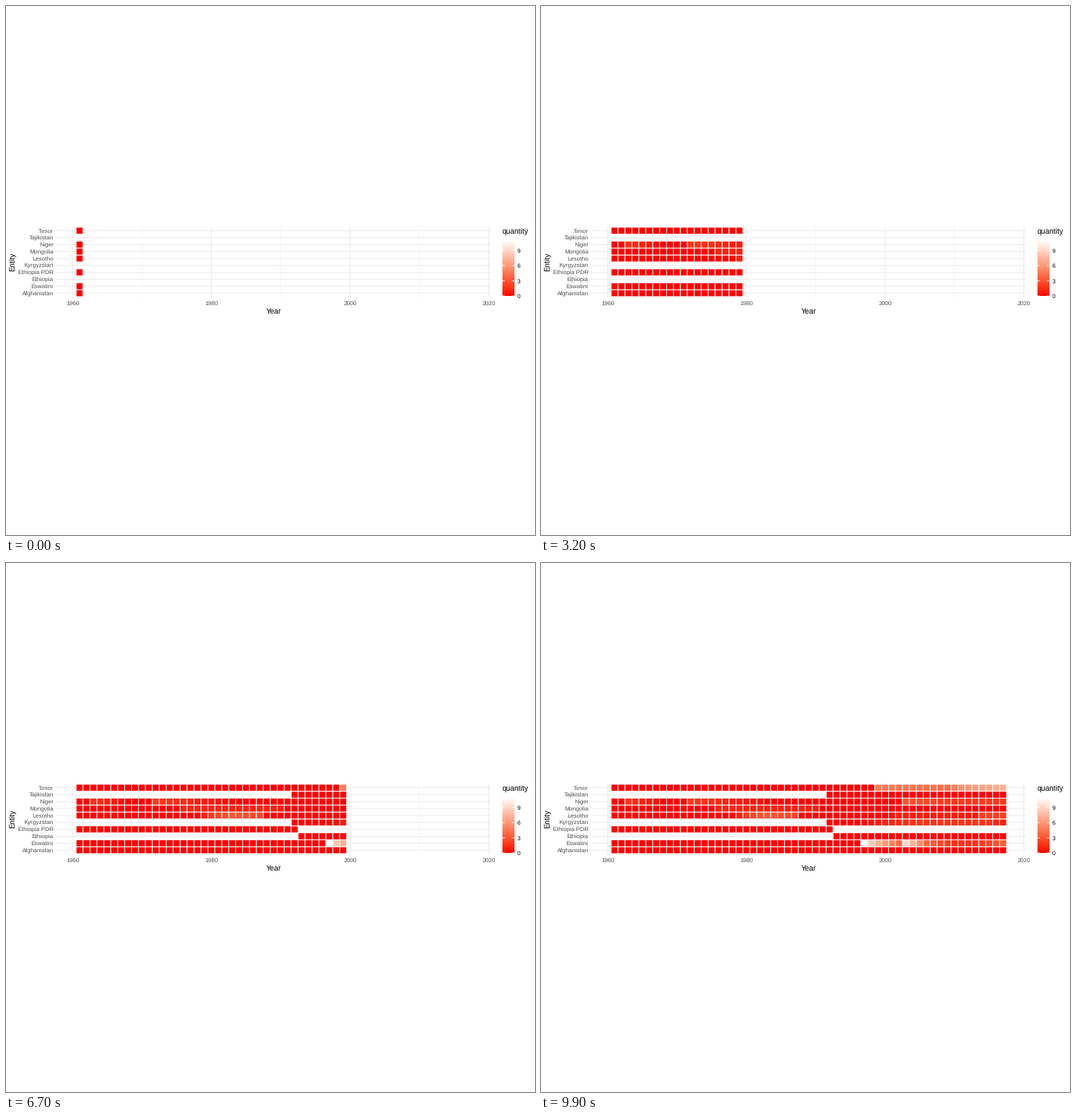
A matplotlib script that plays this animation: 748x748 px, repeating every 10 s.

```python
import numpy as np
import matplotlib.pyplot as plt
from matplotlib.animation import FuncAnimation
from matplotlib.collections import PolyCollection

plt.rcParams["font.family"] = "Liberation Sans"
plt.rcParams["text.hinting"] = "none"

SIZE, DPI = 748, 100
FRAMES, INTERVAL = 100, 100
FIRST, LAST = 1961, 2017
CELL = 9.81
LEFT, RIGHT, TOP, BOTTOM = 71.2, 686.1, 311.8, 412.0
PEAK = 11
SMALL, LARGE = 8.4, 10.6
LINE = 1.07

ENTITIES = ["Afghanistan", "Eswatini", "Ethiopia", "Ethiopia PDR", "Kyrgyzstan",
            "Lesotho", "Mongolia", "Niger", "Tajikistan", "Timor"]
SPANS = {"Ethiopia": (1993, LAST), "Ethiopia PDR": (FIRST, 1992),
         "Kyrgyzstan": (1992, LAST), "Tajikistan": (1992, LAST)}
# Turning points (year, quantity), joined by straight lines; the rest stay at 0
TRENDS = {
    "Timor": [(1998, 0), (1999, 4.6), (2009, 4), (2011, 5.8), (2017, 7.2)],
    "Niger": [(1962, 0), (1963, 1.6), (1968, 0), (1971, 0), (1972, 1.8),
              (1984, 0), (2002, 0), (2003, 2.8), (2010, 1.7)],
    "Mongolia": [(1975, 0), (1976, 1), (1990, 0.8), (1991, 0)],
    "Lesotho": [(1978, 0), (1980, 1.9), (1983, 3), (1987, 2.2), (1988, 0),
                (2000, 0), (2002, 0.8), (2013, 0.6), (2014, 2)],
    "Kyrgyzstan": [(1996, 0), (2000, 1), (2005, 1.6), (2015, 1.5), (2017, 0.8)],
    "Eswatini": [(1996, 0), (1997, PEAK), (1998, 8.2), (2002, 3.8), (2003, 9),
                 (2006, 3.6), (2010, 1.6), (2013, 1.5), (2017, 3.3)],
}


def series(name):
    """Yearly values of one entity, NaN outside its span."""
    start, end = SPANS.get(name, (FIRST, LAST))
    points = TRENDS.get(name, [(FIRST, 0)])
    inside = (years >= start) & (years <= end)
    return np.where(inside, np.interp(years, *zip(*points)), np.nan)


def shade(value):
    """Red to white, passing through orange."""
    t = np.asarray(value, float) / PEAK
    return np.stack([np.ones_like(t), t ** 0.85, t ** 1.25], -1)


def x_of(year):
    return 94.2 + (year - 1960) * CELL


def y_of(row):
    return 406.05 - row * CELL


def pt(px):
    return px * 72 / DPI


def label(x, y, text, size, color="black", ha="left", rotation=0):
    ax.text(x, y, text, fontsize=pt(size), color=color, ha=ha, va="baseline",
            rotation=rotation, rotation_mode="anchor")


def rule(xs, ys, width=LINE, color="#EBEBEB", z=1):
    ax.plot(xs, ys, color=color, lw=pt(width), zorder=z,
            solid_capstyle="butt", snap=False)


def draw_axes():
    for year in range(1960, 2021, 10):
        major = year % 20 == 0
        rule([x_of(year)] * 2, [TOP, BOTTOM], LINE if major else LINE / 2)
        if major:
            label(x_of(year), 422.8, str(year), SMALL, "#4D4D4D", "center")
    for row, name in enumerate(ENTITIES):
        y = y_of(row)
        rule([LEFT, RIGHT], [y, y])
        label(67, y + 3, name, SMALL, "#4D4D4D", "right")
    label(378.7, 435, "Year", LARGE, ha="center")
    label(13, 361.9, "Entity", LARGE, ha="center", rotation=90)


def draw_legend():
    x0, x1, top, base = 702, 718.4, 331, 410
    label(701.3, 322.8, "quantity", LARGE)
    ramp = shade(np.linspace(PEAK, 0, 240))[:, None, :]
    ax.imshow(ramp, extent=(x0, x1, base, top), aspect="auto", zorder=2)
    for v in range(0, 10, 3):
        y = base - v * 7.15
        for a, b in ((x0, x0 + 3.2), (x1 - 3.2, x1)):
            rule([a, b], [y, y], color="white", z=3)
        label(722.8, y + 3, str(v), SMALL)


def tiles(year, column):
    """Square outlines and colours for one year's column."""
    h = CELL / 2
    x = x_of(year)
    rows = np.flatnonzero(~np.isnan(column))
    verts = [[(x - h, y - h), (x + h, y - h), (x + h, y + h), (x - h, y + h)]
             for y in map(y_of, rows)]
    return verts, list(shade(column[rows]))


years = np.arange(FIRST, LAST + 1)
values = np.array([series(name) for name in ENTITIES])
# Each year lands on a whole frame, motion is linear in between
keys = np.round((years - FIRST) / (LAST - FIRST) * (FRAMES - 1)).astype(int)

fig = plt.figure(figsize=(SIZE / DPI, SIZE / DPI), dpi=DPI, facecolor="white")
ax = fig.add_axes([0, 0, 1, 1])
draw_axes()
draw_legend()
ax.set_xlim(0, SIZE)
ax.set_ylim(SIZE, 0)
ax.axis("off")

heat = PolyCollection([], edgecolors="white", linewidths=pt(LINE), zorder=4)
heat.set_joinstyle("miter")
heat.set_snap(False)
ax.add_collection(heat, autolim=False)


def update(frame):
    last = int(np.searchsorted(keys, frame, side="right")) - 1
    columns = [(years[i], values[:, i]) for i in range(last + 1)]
    if frame > keys[last]:
        t = (frame - keys[last]) / (keys[last + 1] - keys[last])
        mix = (1 - t) * values[:, last] + t * values[:, last + 1]
        columns.append((years[last] + t, mix))
    verts, colors = [], []
    for year, column in columns:
        v, c = tiles(year, column)
        verts += v
        colors += c
    heat.set_verts(verts)
    heat.set_facecolor(colors)
    return [heat]


anim = FuncAnimation(fig, update, frames=FRAMES, interval=INTERVAL,
                     repeat=True, repeat_delay=0)
plt.show()
```
